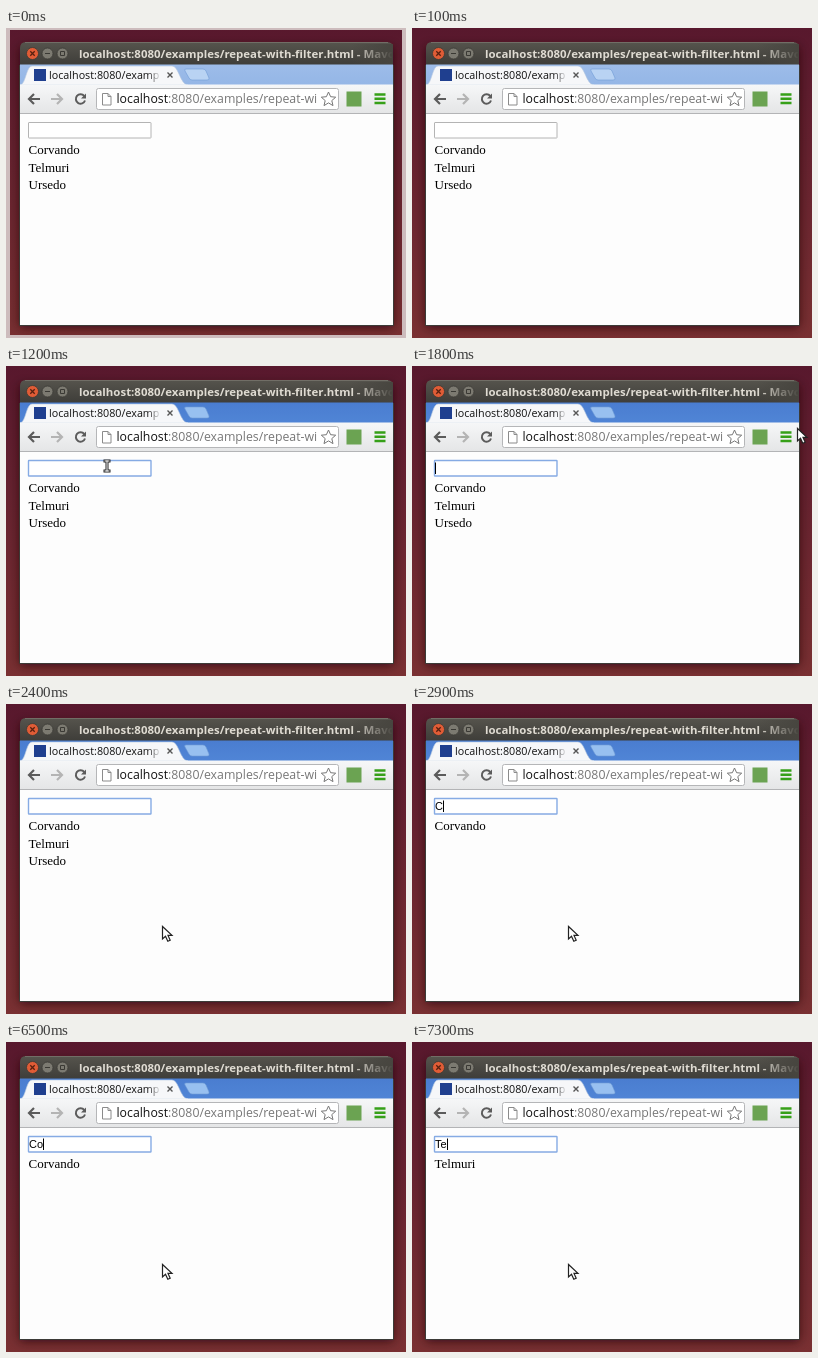
These frames come from a looping animation (400 by 310 pixels, 8 s). An HTML page:

```html
<!DOCTYPE html>
<html lang="en">
<head>
<meta charset="utf-8">
<title>Repeat with filter</title>
<style>
  html, body { margin: 0; width: 100%; height: 100%; overflow: hidden; }
  svg { display: block; width: 100vw; height: 100vh; }
  text { white-space: pre; }
  .ui { font-family: "Open Sans", "Noto Sans", sans-serif; }
  .list { font: 13px "Liberation Serif", serif; }
  .field { font: 11px "Liberation Sans", sans-serif; }
</style>
</head>
<body>
<svg viewBox="0 0 400 310" preserveAspectRatio="none">
  <defs>
    <linearGradient id="desktop" x2="0" y2="1">
      <stop stop-color="#58182d"/><stop offset="1" stop-color="#793032"/>
    </linearGradient>
    <linearGradient id="titlebar" x2="0" y2="1">
      <stop stop-color="#56544d"/><stop offset="1" stop-color="#3d3c38"/>
    </linearGradient>
    <linearGradient id="titleFade">
      <stop stop-color="#47453f" stop-opacity="0"/><stop offset="1" stop-color="#47453f"/>
    </linearGradient>
    <linearGradient id="tabFade">
      <stop stop-color="#f6f7f9" stop-opacity="0"/><stop offset="1" stop-color="#f6f7f9"/>
    </linearGradient>
    <linearGradient id="stripActive" x2="0" y2="1">
      <stop stop-color="#4a7dd0"/><stop offset="1" stop-color="#5085d6"/>
    </linearGradient>
    <linearGradient id="stripIdle" x2="0" y2="1">
      <stop stop-color="#9dbce9"/><stop offset="1" stop-color="#94b6e6"/>
    </linearGradient>
    <linearGradient id="toolbar" x2="0" y2="1">
      <stop stop-color="#f6f7f8"/><stop offset="1" stop-color="#e4e5e6"/>
    </linearGradient>
    <filter id="blur" x="-20%" y="-20%" width="140%" height="140%">
      <feGaussianBlur stdDeviation="5"/>
    </filter>
    <clipPath id="titleClip"><path d="M70 14H386V37H70z"/></clipPath>
    <clipPath id="tabClip"><path d="M42 38H154V57H42z"/></clipPath>
  </defs>

  <rect width="400" height="310" fill="url(#desktop)"/>
  <rect x="13" y="18" width="375" height="282" rx="5" fill="#240510" opacity=".65" filter="url(#blur)"/>
  <path id="selection" d="M0 0H400V310H0zM4 2V307H396V2z" fill="#cdbcbd" fill-rule="evenodd"/>
  <path d="M13.500 37V297.500H387.500V37" fill="none" stroke="#3c3b37"/>

  <!-- title bar -->
  <path d="M14 38V20q0-6 6-6H381q6 0 6 6V38z" fill="url(#titlebar)"/>
  <path d="M19 14.500H382" stroke="#716e66"/>
  <g stroke="#3b3a35" stroke-width=".8">
    <circle cx="26.500" cy="25.500" r="6" fill="#e05c36"/>
    <circle cx="41.500" cy="25.500" r="5.500" fill="#7c7a71"/>
    <circle cx="56.500" cy="25.500" r="5.500" fill="#7c7a71"/>
  </g>
  <path d="M24.300 23.300l4.400 4.400m0-4.400l-4.400 4.400" stroke="#57200f" stroke-width="1.300"/>
  <path d="M39 25.500h5M54.500 23.500h4v4h-4z" fill="none" stroke="#3a3934"/>
  <text class="ui" x="73" y="29.500" font-size="11.45" font-weight="700" fill="#dfdbd2"
    clip-path="url(#titleClip)">localhost:8080/examples/repeat-with-filter.html - Mavo Viewer</text>
  <path d="M345 16H387V36H345z" fill="url(#titleFade)"/>

  <!-- tab strip -->
  <rect id="strip" x="14" y="36.500" width="373" height="21"/>
  <path d="M14 57C20 56.500 20 38 26 38H166C173 38 174 56.500 182 57z" fill="#f6f7f9" stroke="#b4c6df" stroke-width=".6"/>
  <path id="newTab" d="M180 41H197q2 0 3 2l3 7q.5 2-2 2H186q-2 0-3-2l-4-7q-1-2 1-2z" stroke="#6f9ad6" stroke-width=".6"/>
  <rect x="28" y="41" width="12" height="12" fill="#1f3f8f"/>
  <text class="ui" x="43" y="51" font-size="10.75" fill="#111" clip-path="url(#tabClip)">localhost:8080/examples</text>
  <path d="M142 40H155V56H142z" fill="url(#tabFade)"/>
  <path d="M161.500 44.500l5 5m0-5l-5 5" stroke="#555" stroke-width="1.400"/>

  <!-- toolbar -->
  <rect x="14" y="56.500" width="373" height="29.500" fill="url(#toolbar)"/>
  <path d="M14 85.500H387" stroke="#b3b4b6"/>
  <g fill="none" stroke-width="2.200">
    <path d="M34 71H23.500M28 66L23 71l5 5" stroke="#5b5b5b"/>
    <path d="M45 71H55.500M51 66l5 5-5 5" stroke="#b4b4b4"/>
    <path d="M78.200 68A4.700 4.700 0 1 0 79 72.500" stroke="#5b5b5b" stroke-width="2"/>
  </g>
  <path d="M80 65.500V70.500H75z" fill="#5b5b5b"/>
  <rect x="90.500" y="60.500" width="242" height="21" rx="2" fill="#fff" stroke="#b5b6b8"/>
  <path d="M96.500 65.500H102l3 3V77H96.500zM102 65.500v3h3" fill="#fff" stroke="#8b8b8b"/>
  <text class="ui" x="110.500" y="75" font-size="12.300" fill="#777"><tspan fill="#111">localhost</tspan>:8080/examples/repeat-wi</text>
  <path d="M322.500 64l2.100 4.700 5.100.5-3.900 3.400 1.200 5-4.500-2.700-4.500 2.700 1.200-5-3.900-3.400 5.100-.5z" fill="#fff" stroke="#777"/>
  <rect x="340.500" y="63.500" width="15" height="15" fill="#6ba352"/>
  <path d="M368.500 66.500H379.500M368.500 70.800H379.500M368.500 75H379.500" stroke="#36a018" stroke-width="2.500"/>

  <!-- page -->
  <path d="M14 86H387V297H14z" fill="#fdfdfd"/>
  <rect id="input" x="22.500" y="94.500" width="122.500" height="15.500" rx=".5" fill="#fff"/>
  <text id="query" class="field" x="23" y="106"></text>
  <path id="caret" d="M0 96.500V108" stroke="#000"/>
  <g id="list" class="list"></g>

  <g id="arrow">
    <path d="M.5.500V13l3-2.700 2.300 5 2.400-1.100-2.200-4.800H10z" fill="#fff" stroke="#222" stroke-width="1.200"/>
  </g>
  <g id="beam" fill="none" stroke-linecap="square">
    <path id="beamShape" d="M-2-5H2M-2 5H2M0-5V5" stroke="#222" stroke-width="3"/>
    <path d="M-2-5H2M-2 5H2M0-5V5" stroke="#fff"/>
  </g>
</svg>
<script>
const LOOP = 8000, FOCUS_AT = 300, TYPING_AT = 2800;
const names = ["Corvando", "Telmuri", "Ursedo"];
const typing = [
  [0, ""], [2800, "C"], [3000, "Co"], [3200, "Cor"],
  [6500, "Co"], [6600, "C"], [6800, ""], [7100, "T"], [7300, "Te"]
];
const pointer = [
  [200, 290, 285], [500, 121, 137], [900, 101, 100], [1200, 101, 100],
  [1600, 385, 27], [1800, 385, 62], [2250, 165, 229], [2400, 156, 222]
];

const $ = id => document.getElementById(id);
const show = (id, on) => $(id).setAttribute("visibility", on ? "visible" : "hidden");
const setAll = (id, attrs) => {
  for (const key in attrs) $(id).setAttribute(key, attrs[key]);
};

const rows = names.map(() => {
  const row = document.createElementNS("http://www.w3.org/2000/svg", "text");
  row.setAttribute("x", 22.5);
  return $("list").appendChild(row);
});

function pointerAt(t) {
  const next = pointer.findIndex(p => p[0] > t);
  if (next < 1) return pointer[next < 0 ? pointer.length - 1 : 0].slice(1);
  const [t0, x0, y0] = pointer[next - 1], [t1, x1, y1] = pointer[next];
  const u = (t - t0) / (t1 - t0), k = u * u * (3 - 2 * u);
  return [x0 + (x1 - x0) * k, y0 + (y1 - y0) * k];
}

function draw(t) {
  const focused = t >= FOCUS_AT;
  show("selection", t < 100);
  setAll("strip", { fill: focused ? "url(#stripActive)" : "url(#stripIdle)" });
  setAll("newTab", { fill: focused ? "#98c0f0" : "#b9d3f3" });
  setAll("input", {
    stroke: focused ? "#86abe4" : "#b4b4b4",
    "stroke-width": focused ? 1.4 : 1
  });

  const query = typing.findLast(step => step[0] <= t)[1];
  $("query").textContent = query;
  const caretX = 23.5 + (query ? Math.round($("query").getComputedTextLength()) : 0);
  setAll("caret", { transform: `translate(${caretX})` });
  show("caret", focused && (t >= TYPING_AT || Math.floor(t / 500) % 2));

  const matches = names.filter(name => name.toLowerCase().includes(query.toLowerCase()));
  rows.forEach((row, i) => {
    row.textContent = matches[i] || "";
    row.setAttribute("y", 126 + i * 17.7);
  });

  const [x, y] = pointerAt(t);
  const overInput = x > 22 && x < 145 && y > 94 && y < 110;
  for (const id of ["arrow", "beam"]) {
    setAll(id, { transform: `translate(${x} ${y})` });
    show(id, t >= pointer[0][0] && (id === "beam") === overInput);
  }
}

const start = performance.now();
function tick() {
  draw((performance.now() - start) % LOOP);
  requestAnimationFrame(tick);
}
tick();
</script>
</body>
</html>
```
